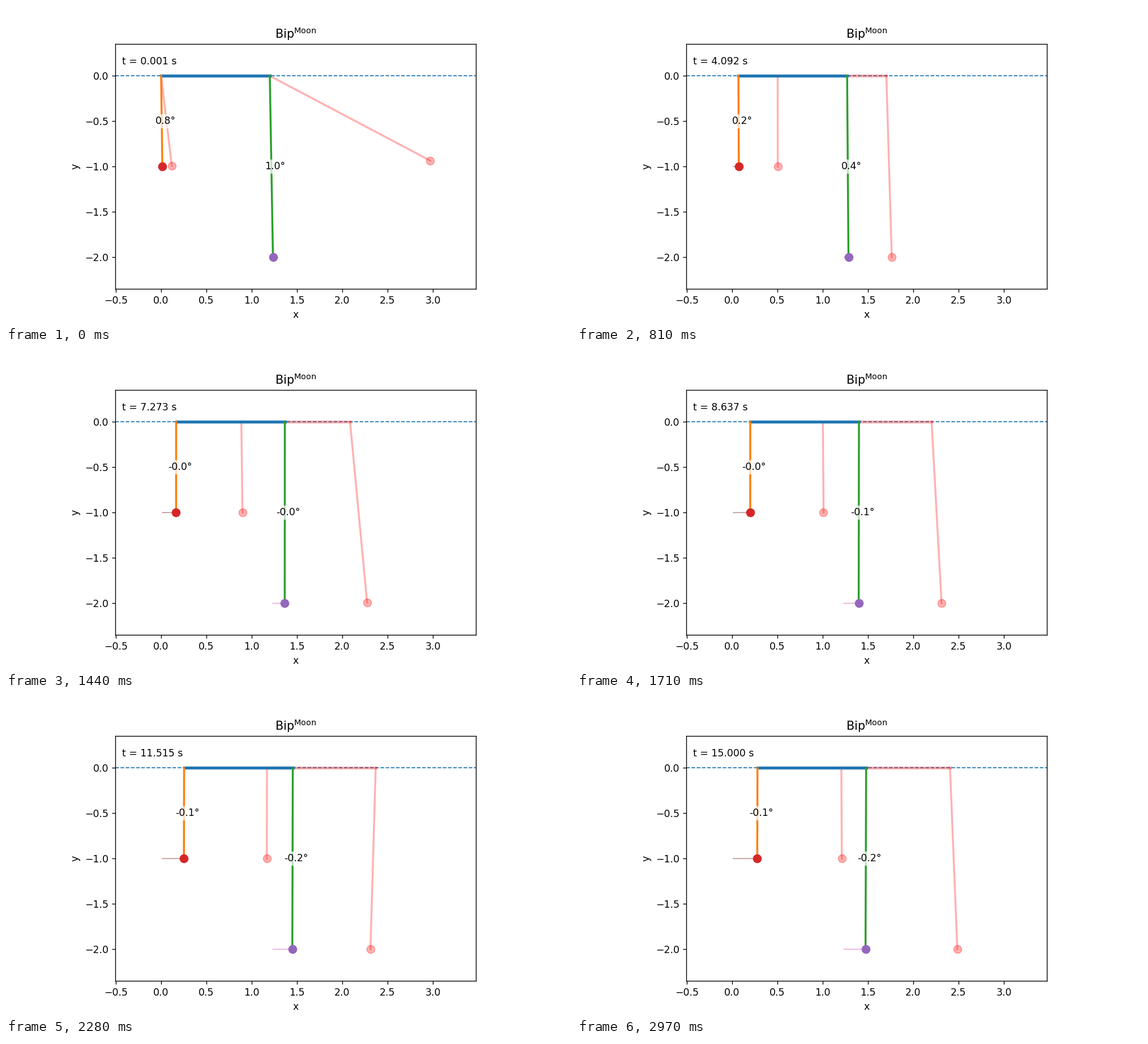
Animation of 998 by 561 pixels, one loop 3 s. Source, as a matplotlib script:

```python
import numpy as np
import matplotlib.pyplot as plt
from matplotlib.animation import FuncAnimation

W, H, DPI = 998, 561, 124.75
FRAMES, INTERVAL = 100, 30
SPAN = 1.2
LENGTHS = (1.0, 2.0)

plt.rcParams["font.family"] = "DejaVu Sans"
times = np.linspace(0.001, 15, FRAMES)
knots = times[[0, 15, 38, 48, 67, 84, 99]]


def curve(values):
    """Smooth Hermite path through the knots, starting at rest."""
    v = np.array(values, float)
    slope = np.gradient(v, knots)
    slope[0] = 0
    i = np.clip(np.searchsorted(knots, times, side="right") - 1, 0, len(knots) - 2)
    h = knots[i + 1] - knots[i]
    s = (times - knots[i]) / h
    return ((1 + 2 * s) * (1 - s) ** 2 * v[i] + s * (1 - s) ** 2 * h * slope[i]
            + s**2 * (3 - 2 * s) * v[i + 1] + s**2 * (s - 1) * h * slope[i + 1])


class Rig:
    """Sliding beam with a pendulum hanging from each end."""

    def __init__(self, ax, x, angles, colors, alpha, z):
        self.x = curve(x)
        self.angles = [curve(a) for a in angles]
        style = dict(alpha=alpha, zorder=z)
        self.beam, = ax.plot([], [], color=colors[0], lw=3, **style)
        self.arms = [ax.plot([], [], color=c, lw=2, **style)[0] for c in colors[1:3]]
        self.bobs = [ax.plot([], [], "o", color=c, ms=8, alpha=alpha, zorder=z + 0.2)[0]
                     for c in colors[3:]]

    def bob(self, k, n):
        a = np.radians(self.angles[k][n])
        return self.x[n] + k * SPAN + LENGTHS[k] * np.sin(a), -LENGTHS[k] * np.cos(a)

    def draw(self, n):
        x = self.x[n]
        self.beam.set_data([x, x + SPAN], [0, 0])
        for k in range(2):
            bx, by = self.bob(k, n)
            self.arms[k].set_data([x + k * SPAN, bx], [0, by])
            self.bobs[k].set_data([bx], [by])


fig = plt.figure(figsize=((W + 0.01) / DPI, (H + 0.01) / DPI), dpi=DPI)
ax = fig.add_axes([0.125, 0.11, 0.775, 0.77])
ax.set_aspect("equal", adjustable="box")
ax.set(xlim=(-0.506, 3.475), ylim=(-2.35, 0.35), xlabel="x", ylabel="y",
       xticks=np.arange(-0.5, 3.1, 0.5), yticks=np.arange(-2, 0.1, 0.5))
ax.set_title(r"Bip$^{\mathrm{Moon}}$")
ax.axhline(0, color="C0", ls="--", lw=1, zorder=2)

ghost = Rig(ax, [0, 0.224, 0.748, 0.886, 1.109, 1.2, 1.206],
            [[6.8, 2.43, -0.57, 0.7, -0.36, 0.18, 0.3],
             [62.2, 24, -5.3, 5.4, -2.96, 0.47, 2.3]],
            ["red"] * 5, 0.3, 2.1)
solid = Rig(ax, [0, 0.023, 0.122, 0.166, 0.232, 0.268, 0.28],
            [[0.8, 0.6, -0.02, -0.03, -0.04, -0.17, -0.13],
             [1.0, 0.8, 0.1, -0.03, -0.1, -0.19, -0.2]],
            ["C0", "C1", "C2", "C3", "C4"], 1, 3)
trails = [ax.plot([], [], color=c, lw=1, alpha=0.6, zorder=3.1)[0] for c in ("C5", "C6")]

clock = ax.text(-0.434, 0.127, "")
box = dict(boxstyle="round,pad=0.2", fc="white", ec="none", alpha=0.7)
labels = [ax.text(0, 0, "", ha="center", va="center", bbox=box, zorder=4) for _ in range(2)]


def update(n):
    ghost.draw(n)
    solid.draw(n)
    clock.set_text(f"t = {times[n]:.3f} s")
    for k in range(2):
        trails[k].set_data(*solid.bob(k, slice(0, n + 1)))
        bx, by = solid.bob(k, n)
        labels[k].set_position(((solid.x[n] + k * SPAN + bx) / 2 + 0.04, by / 2))
        labels[k].set_text(f"{solid.angles[k][n]:.1f}°")
    return []


anim = FuncAnimation(fig, update, frames=FRAMES, interval=INTERVAL,
                     repeat=True, repeat_delay=0, blit=False)
plt.show()
```
